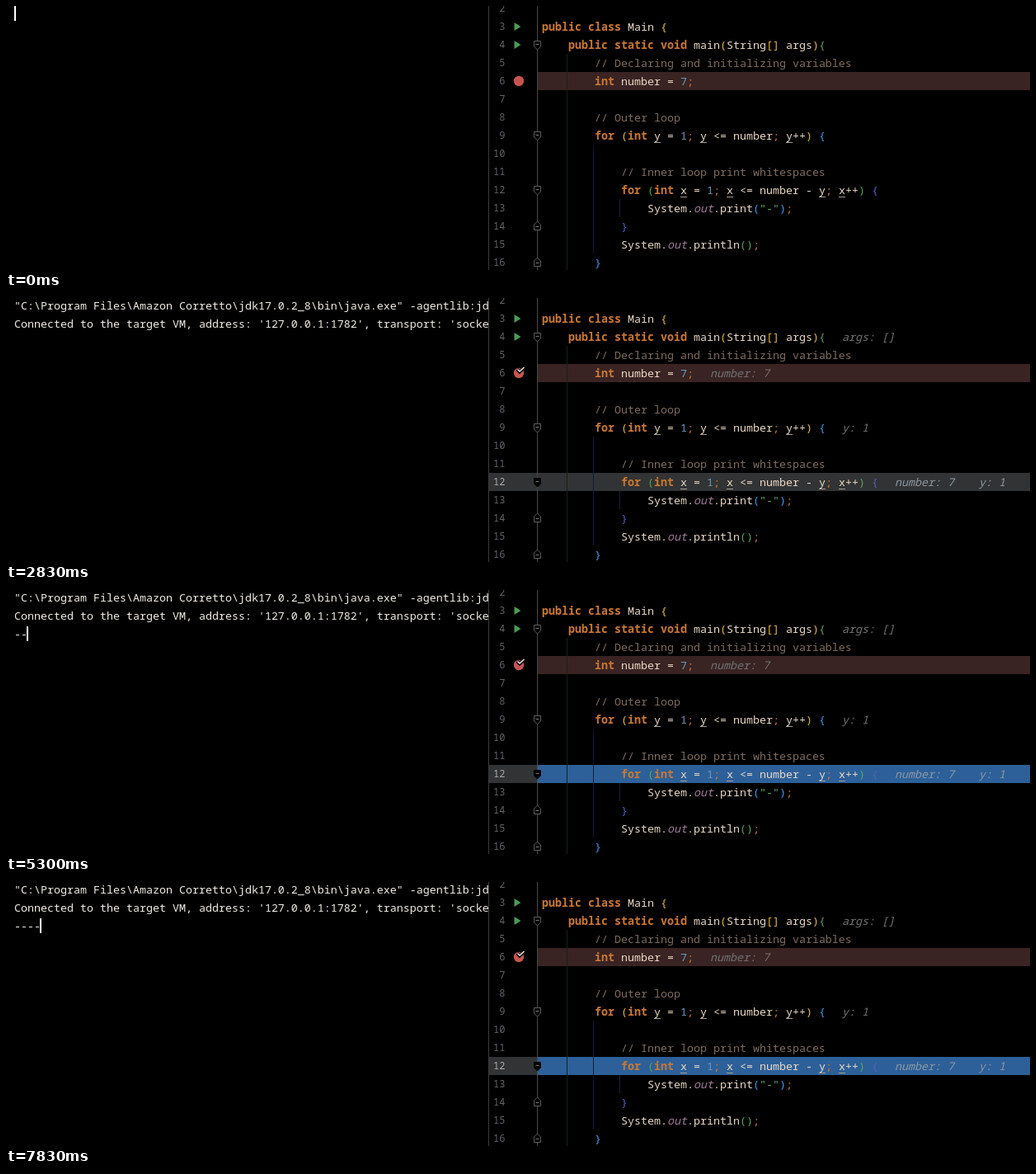
An HTML page that plays this animation: 1242x320 px, repeating every 8 s.

```html
<!DOCTYPE html>
<html lang="en">
<head>
<meta charset="utf-8">
<title>Debugger stepping through nested loops</title>
<style>
  html, body { margin: 0; width: 100%; height: 100%; overflow: hidden; background: #000; }
  #stage {
    position: relative; width: 1242px; height: 320px; overflow: hidden; background: #000;
    font: 13.333px/22px "Noto Sans Mono", "DejaVu Sans Mono", monospace;
    font-variant-ligatures: none; white-space: pre; color: #ead9c6;
  }
  #stage div, svg { position: absolute; }
  #console { left: 0; top: -2px; width: 585px; height: 322px; overflow: hidden; color: #f3eee6; }
  #console div { left: 10px; }
  #caret { width: 2px; height: 18px; background: #fff; }

  .row { left: 586px; width: 656px; height: 22px; }
  .row .band { left: 59px; right: 0; height: 22px; }
  .row .num { left: 0; width: 19.5px; text-align: right; font-size: 12px; color: #606366; }
  .row .code { left: 64px; }
  .break .band { background: #3a2323; }
  .run, .step { background: #323334; }
  .step .band { background: #2d6099; }
  .run .num, .step .num { color: #a9a9a9; }

  .kw { color: #cc7832; font-weight: bold; }
  .semi { color: #cc7832; }
  .comment { color: #806c5e; }
  .lit { color: #6897bb; }
  .str { color: #6aab73; }
  .field { color: #a07c98; font-style: italic; }
  .var { box-shadow: inset 0 -1px #a89c90; }
  .hint { color: #727272; font-style: italic; margin-left: 20px; }
  .hint + .hint { margin-left: 30px; }
  .run .hint, .step .hint { color: #8c98a4; }
  svg { left: 0; top: 0; }
</style>
</head>
<body>
<div id="stage">
  <div id="console"></div>
  <div id="caret"></div>
</div>
<script>
const LOOP = 8000;
const stage = document.getElementById('stage');
const consoleBox = document.getElementById('console');
const caret = document.getElementById('caret');

const source = [
  '',
  'public class Main {',
  '    public static void main(String[] args){',
  '        // Declaring and initializing variables',
  '        int number = 7;',
  '',
  '        // Outer loop',
  '        for (int y = 1; y <= number; y++) {',
  '',
  '            // Inner loop print whitespaces',
  '            for (int x = 1; x <= number - y; x++) {',
  '                System.out.print("-");',
  '            }',
  '            System.out.println();',
  '        }'
];
const FIRST_LINE = 2;
const lineTop = n => 14 + 22 * (n - 3);

// Syntax colouring; bracket colours follow the nesting depth.
const bracketColors = ['#e8ba36', '#54a857', '#359ff4', '#5060bb'];
const token = /(\/\/.*)|\b(public|class|static|void|int|for)\b|(".*?")|\b(\d+)\b|\b(out)\b|\b([xy])\b|(;)|([()[\]{}])|(<)/g;
const kinds = ['comment', 'kw', 'str', 'lit', 'field', 'var', 'semi'];
let depth = 0;

function bracketColor(c) {
  if (c === '{') return bracketColors[depth++];
  if (c === '}') return bracketColors[--depth];
  return bracketColors['[]'.includes(c) ? 0 : Math.max(0, depth - 2)];
}

function highlight(line) {
  return line.replace(token, (text, ...groups) => {
    const kind = groups.slice(0, 9).findIndex(g => g !== undefined);
    if (kind === 8) return '&lt;';
    if (kind === 7) return `<span style="color:${bracketColor(text)}">${text}</span>`;
    return `<span class="${kinds[kind]}">${text}</span>`;
  });
}

const rows = {};
source.forEach((line, i) => {
  const n = i + FIRST_LINE;
  const el = document.createElement('div');
  el.style.top = lineTop(n) + 'px';
  el.innerHTML = `<div class="band"></div><div class="num">${n}</div>` +
    `<div class="code">${highlight(line)}<span class="hints"></span></div>`;
  stage.append(el);
  rows[n] = { el, hints: el.querySelector('.hints') };
});

// Gutter icons, indent guides and dividers.
const vline = (x, y1, y2, color) =>
  `<path d="M${x + .5} ${y1}V${y2}" stroke="${color}"/>`;
const play = n => `<path d="M616.5 ${lineTop(n) + 6}l8 5-8 5z" fill="#499c54"/>`;
const fold = (n, dir) => `<g id="fold${n}" transform="translate(644.5 ${lineTop(n) + 11}) scale(1 ${dir})">
  <path d="M-4-4.5H4V2L0 6L-4 2z" fill="#000" stroke="#5c5c5c"/><path d="M-2-.5H2" stroke="#777"/></g>`;

stage.insertAdjacentHTML('beforeend', `<svg width="1242" height="320" fill="none">
  ${vline(585, 0, 320, '#3c3c3c')}${vline(644, 0, 320, '#4a4a4a')}
  ${vline(680, 58, 320, '#142414')}${vline(712, 168, 300, '#101c38')}${vline(744, 234, 256, '#1a1e3c')}
  ${play(3)}${play(4)}
  ${[4, 9, 12].map(n => fold(n, 1)).join('')}${[14, 16].map(n => fold(n, -1)).join('')}
  <circle cx="622" cy="91" r="6.2" fill="#c75450"/>
  <g id="check"><path d="M620 86.500l3 3 6-5.500" stroke="#000" stroke-width="4"/>
  <path d="M620.500 86.500l2.500 2.500 5.500-5" stroke="#eee" stroke-width="1.500"/></g>
</svg>`);
const check = document.getElementById('check');

// [time, line, running]: a running line is grey, a paused one blue.
const steps = [
  [0, 0], [40, 6], [980, 6, 1], [1020, 9], [1960, 9, 1], [2000, 12],
  [2830, 12, 1], [2870, 13], [3670, 13, 1], [3710, 12],
  [4520, 13], [5090, 13, 1], [5130, 12],
  [5770, 12, 1], [5810, 13], [6380, 13, 1], [6420, 12],
  [7060, 13], [7620, 13, 1], [7660, 12]
];
const prints = [3880, 5300, 6590, 7830];
const blinks = [980, 1490, 2460, 3340, 5020, 5300, 6280, 6590, 7530, 7830];
const passed = (times, t) => times.filter(at => at <= t).length;

function hintsFor(n, line, dashes) {
  if (n === 4 && line) return ['args: []'];
  if (n === 6 && line > 6) return ['number: 7'];
  if (n === 9 && line >= 9) return [line === 9 ? 'number: 7' : 'y: 1'];
  if (n === 12 && line === 12) return ['number: 7', 'y: 1'];
  if (n === 12 && line === 13) return ['x: ' + (dashes + 1)];
  return [];
}

function render(t) {
  const [, line, running] = steps.filter(s => s[0] <= t).pop();
  const dashes = passed(prints, t);

  for (const n in rows) {
    const { el, hints } = rows[n];
    const active = +n === line;
    el.className = 'row' + (+n === 6 ? ' break' : '') + (active ? (running ? ' run' : ' step') : '');
    hints.innerHTML = hintsFor(+n, line, dashes).map(h => `<span class="hint">${h}</span>`).join('');
    const icon = document.getElementById('fold' + n);
    if (icon) {
      icon.firstElementChild.setAttribute('stroke', active ? '#000' : '#5c5c5c');
    }
  }
  check.style.display = line ? '' : 'none';

  const output = line ? [
    '"C:\\Program Files\\Amazon Corretto\\jdk17.0.2_8\\bin\\java.exe" -agentlib:jd',
    "Connected to the target VM, address: '127.0.0.1:1782', transport: 'socke",
    '-'.repeat(dashes)
  ] : [];
  consoleBox.innerHTML = output.map((text, i) => `<div style="top:${22 * i}px">${text}</div>`).join('');

  caret.style.left = Math.max(10, 9 + 8 * dashes) + 'px';
  caret.style.top = (line ? 44 : 0) + 'px';
  caret.style.visibility = passed(blinks, t) % 2 ? 'hidden' : 'visible';
}

let shown = '';
const start = performance.now();
function tick() {
  const t = (performance.now() - start) % LOOP;
  const key = [passed(steps.map(s => s[0]), t), passed(prints, t), passed(blinks, t)].join();
  if (key !== shown) render(t);
  shown = key;
  requestAnimationFrame(tick);
}
tick();
</script>
</body>
</html>
```
